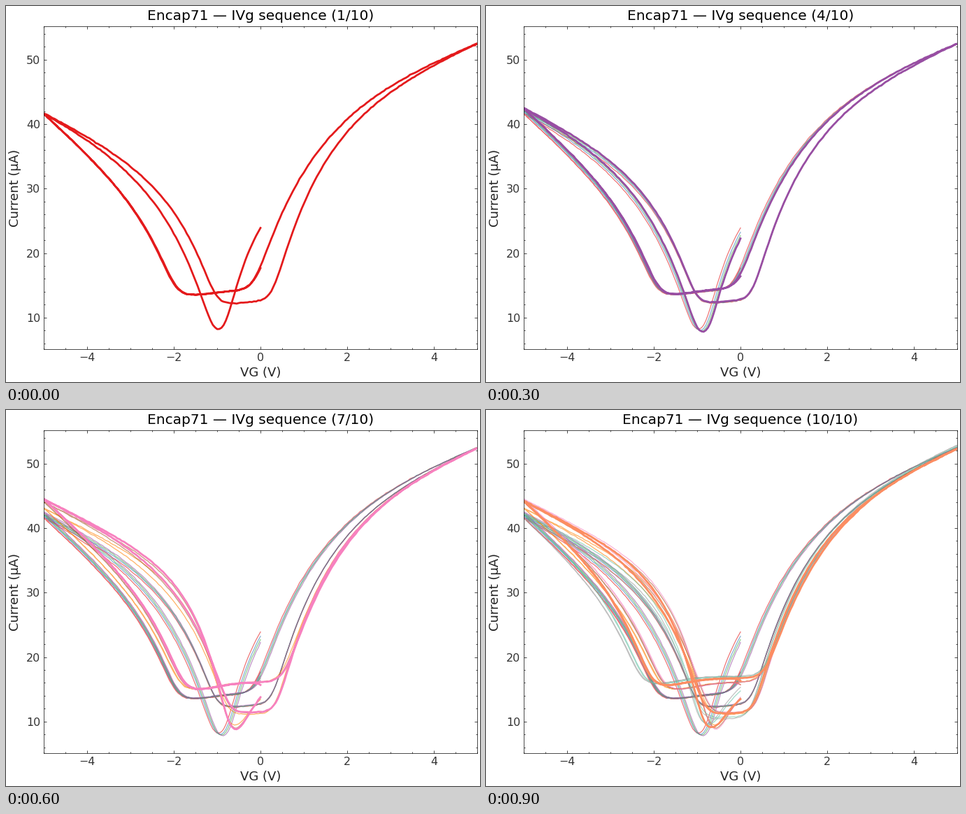
A matplotlib script that plays this animation: 678 by 538 pixels, repeating every 1000 ms.

```python
import numpy as np
import matplotlib.pyplot as plt
from matplotlib.animation import FuncAnimation
from matplotlib.ticker import MultipleLocator

W, H, DPI = 678, 538, 100
plt.rcParams["font.family"] = "DejaVu Sans"


def leg(floor, tilt, left_knee, right_knee, left_end, right_end):
    return np.array([floor, tilt, left_knee, right_knee, left_end, right_end])


# Device states: the legs of a sweep, and how far each leg drifts
FRESH = dict(
    dip=leg(7.45, 0, -1.095, -.82, 41.6, 23.9),
    dip_drift=leg(-.4, 0, .1, .1, .8, -1.7),
    forward=leg(13.75, .5, -1.97, -.14, 41.6, 52.5),
    forward_drift=leg(.15, .1, .05, .1, .8, 0),
    back=leg(12.4, .35, -1.03, .28, 41.7, 52.5),
    back_drift=leg(.15, 0, 0, 0, .8, 0),
    dip_tau=1.05)
SHIFTED = dict(
    dip=leg(8.9, 0, -.77, -.5, 43.1, 13.45),
    dip_drift=leg(-.75, 0, .03, .02, 1.4, .3),
    forward=leg(15.4, .75, -1.88, .5, 43.1, 52.4),
    forward_drift=leg(0, 0, .08, .06, 1.4, 0),
    back=leg(11.15, .1, -.78, .35, 43.1, 52.4),
    back_drift=leg(.3, 0, .04, .04, 1.4, 0),
    dip_tau=.66)
AGED = dict(
    dip=leg(9.1, 0, -.94, -.62, 42.3, 14.8),
    dip_drift=leg(-.5, 0, .07, .05, 1.9, -1.3),
    forward=leg(16.2, .75, -2.25, .57, 42.3, 52.7),
    forward_drift=leg(-.2, 0, .16, .02, 1.9, -.4),
    back=leg(10.7, .15, -.9, .27, 42.3, 52.7),
    back_drift=leg(.6, 0, .06, .06, 1.9, -.4),
    dip_tau=.66)

SWEEPS = [
    ("#e41a1c", FRESH, 0), ("#377eb8", FRESH, .4), ("#4daf4a", FRESH, .7),
    ("#984ea3", FRESH, 1), ("#ff7f00", SHIFTED, 0), ("#a65628", SHIFTED, .7),
    ("#f781bf", SHIFTED, 1), ("#999999", AGED, -.4), ("#66c2a5", AGED, 0),
    ("#fc8d62", AGED, 1),
]


def arm(distance, reach, rise, width, tau, slope):
    """Soft knee, then a saturating rise that gains `rise` at `reach`."""
    s = width * np.logaddexp(0, distance / width)
    gain = (rise - slope * reach) / (1 - np.exp(-reach / tau))
    return gain * (1 - np.exp(-s / tau)) + slope * s


def curve(x, params, width, left, right, stop=5):
    """Flat floor between a left arm and a right arm, each (tau, slope)."""
    floor, tilt, left_knee, right_knee, left_end, right_end = params
    return (floor + tilt * np.tanh((x - left_knee - .8) / .6)
            + arm(left_knee - x, left_knee + 5, left_end - floor + tilt,
                  width, *left)
            + arm(x - right_knee, stop - right_knee, right_end - floor - tilt,
                  width, *right))


def sweep(seed, state, drift):
    """Voltage and current along 0, -5, +5, -5, 0."""
    rng = np.random.default_rng(seed)
    left = np.linspace(-5, 0, 101)
    full = np.linspace(-5, 5, 201)

    def drifted(name):
        return state[name] + drift * state[name + "_drift"]

    def forward(x, knee_shift=0):
        params = drifted("forward") + leg(0, 0, knee_shift, 0, 0, 0)
        return curve(x, params, .12, (.71, 6), (1.25, 2.5))

    dip = curve(left, drifted("dip"), .08, (state["dip_tau"], 3.3), (.8, 0),
                stop=0)
    back = curve(full, drifted("back"), .1, (.9, 3.3), (1.08, 2.9))
    again = forward(left, .02) - .4 * np.exp(left / .1)
    volts = np.concatenate([left[::-1], full, full[::-1], left])
    amps = np.concatenate([dip[::-1], forward(full), back[::-1], again])
    return volts, amps + rng.normal(0, .03, len(amps))


fig = plt.figure(figsize=(W / DPI, H / DPI), dpi=DPI, facecolor="white")
ax = fig.add_axes([54 / W, 47 / H, 620 / W, 462 / H])
ax.set(xlim=(-5, 5), ylim=(5.1, 55.18))
for axis, major, minor in ((ax.xaxis, 2, .5), (ax.yaxis, 10, 2)):
    axis.set_major_locator(MultipleLocator(major))
    axis.set_minor_locator(MultipleLocator(minor))
ax.tick_params(which="both", direction="in", top=True, right=True, width=.5)
ax.tick_params(which="major", length=3, pad=3.5, labelsize=11.4,
               labelcolor="#333333")
ax.tick_params(which="minor", length=1.5)
for spine in ax.spines.values():
    spine.set_linewidth(.5)


def label(x, y, text, size, color, rotation=0):
    return fig.text(x / W, 1 - y / H, text, size=size, color=color,
                    ha="center", va="baseline", rotation=rotation,
                    rotation_mode="anchor")


title = label(364, 20, "", 14.5, "black")
label(364, 530, "VG (V)", 13, "#222222")
label(18.5, 260, "Current (µA)", 13, "#222222", 90)

lines = [ax.plot(*sweep(seed, state, drift), color=color)[0]
         for seed, (color, state, drift) in enumerate(SWEEPS)]


def update(frame):
    title.set_text(f"Encap71 — IVg sequence ({frame + 1}/{len(SWEEPS)})")
    for i, line in enumerate(lines):
        current = i == frame
        line.set_visible(i <= frame)
        line.set_linewidth(2 if current else .9)
        line.set_alpha(1 if current else .6)
    return [title, *lines]


anim = FuncAnimation(fig, update, frames=len(SWEEPS), interval=100,
                     repeat=True, repeat_delay=0)
plt.show()
```
